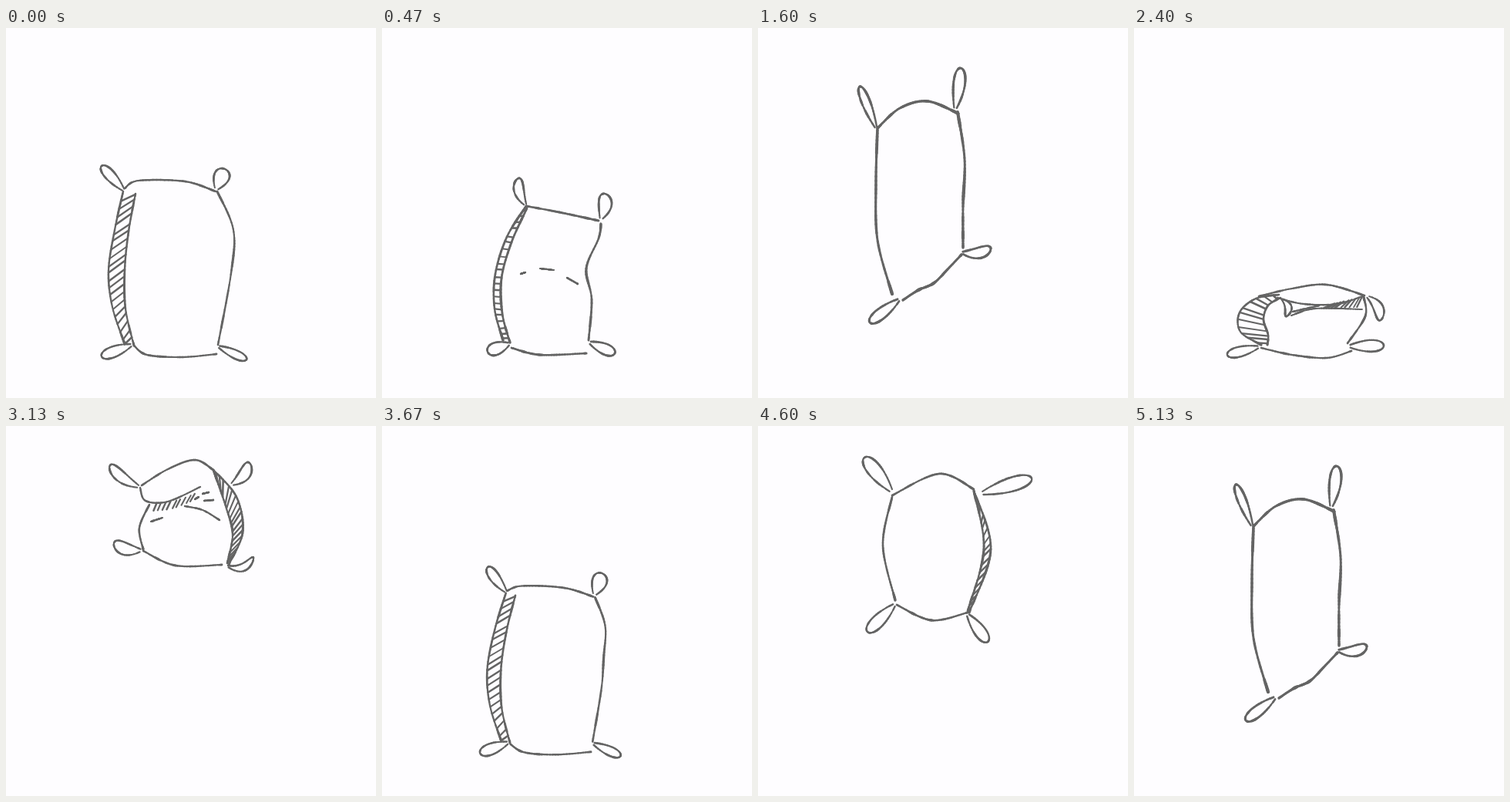
These frames come from a looping animation (480 px wide and 480 px high, 5270 ms). An HTML page with a canvas:

```html
<!DOCTYPE html>
<html lang="en">
<head>
<meta charset="utf-8">
<title>Jumping sack</title>
<style>
html, body { margin: 0; width: 100%; height: 100%; overflow: hidden; background: #fefdff; }
canvas { display: block; width: 480px; height: 480px; }
</style>
</head>
<body>
<canvas id="stage" width="480" height="480"></canvas>
<script>
const LOOP = 5270, SAMPLES = 40;
const SIDES = ['left', 'top', 'right', 'bottom', 'seam'];
const LIMBS = ['armL', 'armR', 'footL', 'footR'];
const ctx = document.getElementById('stage').getContext('2d');

const mix = (a, b, t) => a + (b - a) * t;
const mixPoint = (p, q, t) => [mix(p[0], q[0], t), mix(p[1], q[1], t)];
const noise = n => { const s = Math.sin(n * 127.1 + 11.7) * 43758.5453; return s - Math.floor(s); };
const smoothNoise = x => {
  const i = Math.floor(x), f = x - i;
  return mix(noise(i), noise(i + 1), f * f * (3 - 2 * f));
};
const sample = at => Array.from({ length: SAMPLES + 1 }, (_, k) => at(k / SAMPLES));

// Smooth curve through the key points in "x,y x,y ..."
function curve(text) {
  const p = text.split(' ').map(s => s.split(',').map(Number)), last = p.length - 1;
  return sample(u => {
    const i = Math.min(last - 1, Math.floor(u * last)), t = u * last - i;
    const b = p[i], c = p[i + 1], a = p[i - 1] || b, d = p[i + 2] || c;
    return [0, 1].map(j => b[j] + t / 2 * (c[j] - a[j] +
      t * (2 * a[j] - 5 * b[j] + 4 * c[j] - d[j] + t * (3 * (b[j] - c[j]) + d[j] - a[j]))));
  });
}

// Leaf-shaped limb: narrow at its base, round at its tip, optionally bent sideways
function leaf([x, y, tipX, tipY, width, bend = 0]) {
  const dx = tipX - x, dy = tipY - y, length = Math.hypot(dx, dy);
  return sample(k => {
    const u = mix(-.95, .95, k), t = 1 - u * u;
    const side = (1.3 * width * u * t + 4 * bend * t * (1 - t)) / length;
    return [x + dx * t - dy * side, y + dy * t + dx * side];
  });
}

function pose({ width, shade, marks = [], fold, ...parts }) {
  const lines = {};
  for (const k in parts) lines[k] = LIMBS.includes(k) ? leaf(parts[k]) : curve(parts[k]);
  return { width, shade, lines, marks: marks.map(curve), fold: fold && fold.map(curve) };
}

function blend(a, b, t) {
  const out = { width: mix(a.width, b.width, t), lines: {}, marks: [] };
  for (const k in a.lines)
    if (b.lines[k]) out.lines[k] = a.lines[k].map((p, i) => mixPoint(p, b.lines[k][i], t));
  if (out.lines.seam) {
    const [side, n, slant] = a.shade, [, m, slant2] = b.shade;
    out.shade = [side, Math.round(mix(n, m, t)), mix(slant, slant2, t)];
  }
  return out;
}

// shade: side hatched up to the seam, number of lines, slant
const stand = pose({
  width: 2.6, shade: ['left', 20, .075],
  left: '152,212 141,262 133,315 138,362 154,410',
  seam: '168,215 159,264 154,314 155,364 166,412',
  top: '154,208 172,198 232,199 272,212',
  right: '274,212 295,262 292,318 275,411',
  bottom: '166,412 183,424 228,427 273,423',
  armL: [155, 213, 124, 179, 13], armR: [272, 211, 284, 183, 20],
  footL: [166, 410, 124, 426, 14], footR: [273, 412, 312, 430, 11]
});

const bow = pose({
  width: 2.9, shade: ['left', 21, .03],
  left: '187,231 162,271 147,319 146,364 157,405',
  seam: '188,234 168,278 155,325 156,370 166,408',
  top: '187,231 230,239 281,250',
  right: '284,254 281,273 265,312 272,352 268,405',
  bottom: '168,415 205,424 265,422',
  armL: [188, 232, 177, 195, 13, -4], armR: [283, 250, 289, 215, 17, 3],
  footL: [167, 409, 137, 420, 16], footR: [267, 407, 302, 422, 14],
  marks: ['180,319 186,317', '205,312 223,314', '240,324 254,332']
});

const crouch = pose({
  width: 2.6, shade: ['left', 11, 0],
  left: '188,346 158,351 137,369 138,394 165,411',
  seam: '190,350 174,360 168,378 174,398 173,411',
  top: '162,348 205,338 250,333 299,347',
  right: '298,349 300,374 277,409',
  bottom: '165,415 205,424 250,428 282,419',
  armL: [190, 351, 198, 374, 9, -6], armR: [300, 347, 320, 379, 13, -6],
  footL: [165, 413, 121, 424, 13], footR: [276, 413, 324, 412, 15],
  marks: ['186,350 220,358 264,358 299,347', '204,373 235,364 296,365', '206,368 240,360'],
  fold: ['244,363 291,362', '258,358 297,349']
});

const leap = pose({
  width: 2.8, shade: ['left', 20, .04],
  left: '166,168 149,235 153,310 172,364',
  seam: '170,170 160,235 162,308 174,362',
  top: '166,168 220,150 272,162',
  right: '274,164 286,230 277,300 264,360',
  bottom: '176,372 220,378 262,364',
  armL: [168, 165, 138, 107, 15], armR: [273, 160, 331, 118, 16],
  footL: [176, 368, 144, 405, 14], footR: [262, 361, 290, 398, 13]
});

const rise = pose({
  width: 2.8, shade: ['right', 18, .06],
  left: '174,92 162,155 178,226',
  seam: '280,84 302,160 274,242',
  top: '174,90 235,62 280,82',
  right: '280,84 293,160 272,240',
  bottom: '180,232 225,252 272,242',
  armL: [176, 88, 138, 41, 18], armR: [285, 89, 355, 68, 18],
  footL: [180, 229, 142, 267, 16], footR: [270, 242, 298, 280, 15]
});

const tuck = pose({
  width: 2.6, shade: ['right', 18, .1],
  left: '186,102 173,132 178,160',
  seam: '269,57 299,92 307,138 289,180',
  top: '176,77 210,56 245,44 269,57',
  right: '269,57 285,104 294,140 287,178',
  bottom: '178,162 220,181 280,180',
  armL: [176, 80, 135, 51, 14, -4], armR: [290, 77, 316, 48, 15, 5],
  footL: [178, 161, 140, 152, 16, -4], footR: [284, 180, 321, 171, 10, 9],
  marks: ['174,80 181,97 210,98 252,79', '188,124 203,119', '232,104 255,109 277,122',
    '245,95 250,92', '255,88 263,86', '257,97 269,96'],
  fold: ['188,110 215,107 241,97', '192,100 220,97 247,87']
});

const open = pose({
  width: 2.9,
  left: '160,112 154,180 166,252',
  top: '160,112 215,76 264,98',
  right: '264,98 274,165 268,230',
  bottom: '180,268 225,262 264,238',
  armL: [160, 114, 74, 71, 20], armR: [265, 99, 301, 57, 16],
  footL: [174, 260, 125, 289, 18], footR: [266, 235, 310, 230, 18]
});

const reach = pose({
  width: 3.5,
  left: '155,130 153,200 155,275 174,345',
  top: '155,130 184,104 220,95 260,111',
  right: '259,109 268,170 266,230 266,285',
  bottom: '188,353 208,340 228,331 247,312 264,294',
  armL: [155, 134, 132, 76, 11], armR: [255, 109, 263, 52, 15, 1],
  footL: [186, 350, 145, 382, 14], footR: [262, 291, 302, 286, 14, 4]
});

const drawings = [
  stand, ...[.12, .25, .4, .6, .8].map(t => blend(stand, bow, t)), bow,
  blend(bow, crouch, .5), crouch, blend(crouch, leap, .22), blend(crouch, leap, .6), leap,
  rise, blend(rise, tuck, .5), tuck, open, reach
];

// How long each drawing holds, in fifteenths of a second, jump by jump
const holds = '11122011222222212' + '21121111221222212' + '21121111221222222';
let ticks = 0;
const ends = [...holds].map(h => Math.round((ticks += +h) * 20 / 3) * 10);

// Pencil line whose pressure varies along its length
function pencil(points, width, seed) {
  for (let i = 1; i < points.length; i++) {
    ctx.lineWidth = width * (.75 + .5 * smoothNoise(seed * 31 + i * .45));
    ctx.beginPath();
    ctx.moveTo(...points[i - 1]);
    ctx.lineTo(...points[i]);
    ctx.stroke();
  }
}

function pointAt(points, t) {
  const x = Math.min(1, Math.max(0, t)) * SAMPLES, i = Math.min(SAMPLES - 1, Math.floor(x));
  return mixPoint(points[i], points[i + 1], x - i);
}

function hatch(a, b, n, slant) {
  for (let i = 0; i < n; i++) {
    const t = (i + .7 + .3 * noise(i)) / (n + .6);
    pencil([pointAt(a, t + slant / 2), pointAt(b, t - slant / 2)], 2.3, i);
  }
}

function draw({ lines, width, shade, marks, fold }) {
  ctx.fillStyle = '#fefdff';
  ctx.fillRect(0, 0, 480, 480);
  ctx.lineCap = ctx.lineJoin = 'round';
  ctx.strokeStyle = '#646464';
  SIDES.forEach((k, i) => lines[k] && pencil(lines[k], width, i + 1));
  LIMBS.forEach((k, i) => pencil(lines[k], mix(width, 2.2, .5), i + 6));
  marks.forEach((m, i) => pencil(m, 2.2, i + 10));
  if (shade) hatch(lines[shade[0]], lines.seam, shade[1], shade[2]);
  if (fold) hatch(fold[0], fold[1], 9, 0);
}

const began = performance.now();
let shown = -1;
function tick() {
  const t = (performance.now() - began) % LOOP;
  const i = ends.findIndex(end => t < end);
  if (i !== shown) draw(drawings[(shown = i) % drawings.length]);
  requestAnimationFrame(tick);
}
tick();
</script>
</body>
</html>
```
